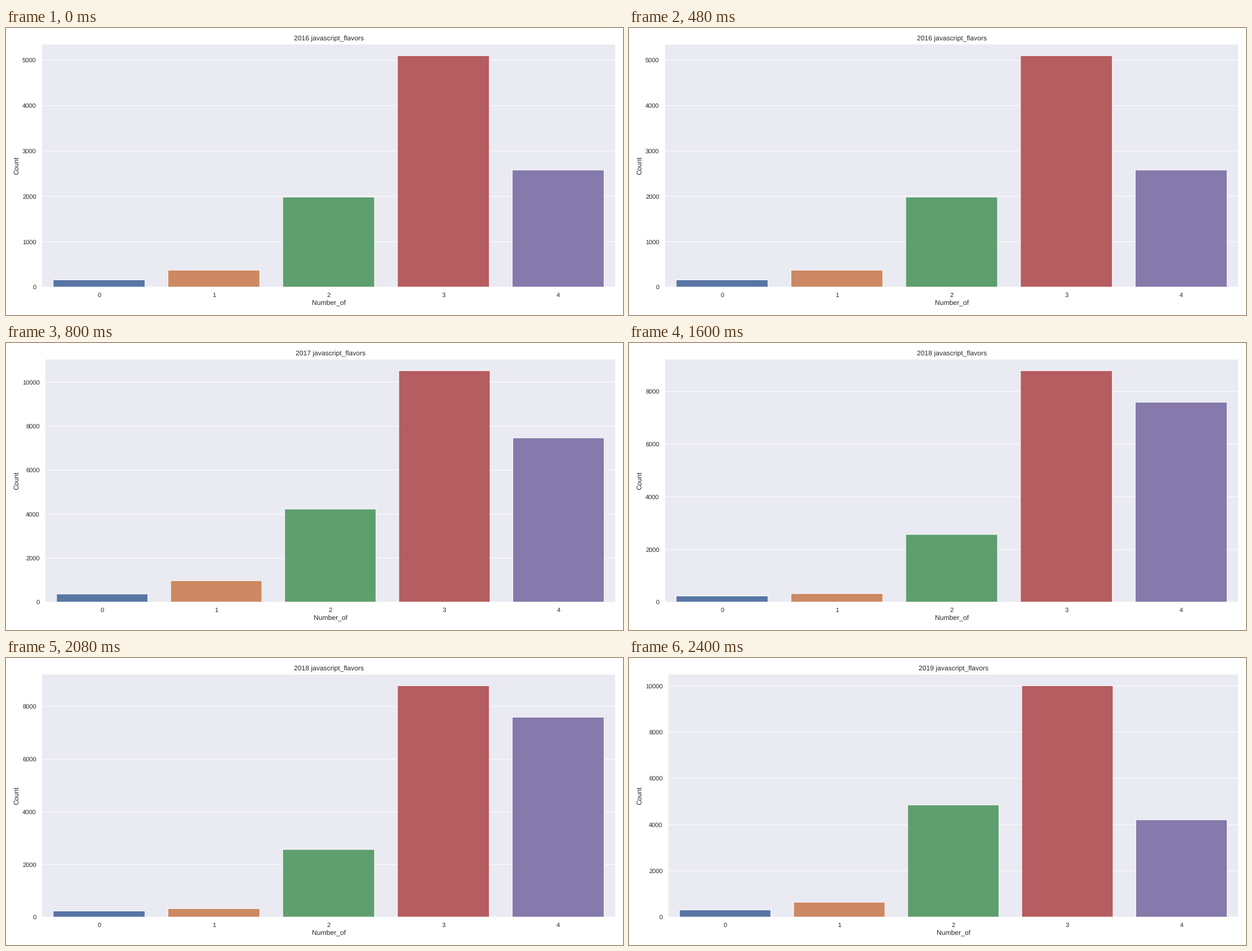
Animation, 1095 px wide and 511 px high, one loop 3.2 s. Source, as a matplotlib script:

```python
import matplotlib.pyplot as plt
from matplotlib.animation import FuncAnimation

W, H, DPI = 1095, 511, 73
RIGHT, TOP, BOTTOM = 1081.7, 28.7, 461.4
LABEL_SPACE, DIGIT = 39.0, 6.1  # the left margin grows with the tick labels
INK = "#262626"
COLORS = ["#5875a4", "#cc8963", "#5f9e6e", "#b55d60", "#857aab"]

COUNTS = {
    2016: [160, 375, 1985, 5100, 2580],
    2017: [370, 975, 4230, 10520, 7465],
    2018: [235, 325, 2570, 8790, 7595],
    2019: [310, 645, 4850, 10010, 4210],
}
YEARS = list(COUNTS)

plt.rcParams.update({
    "font.family": "Liberation Sans",
    "font.size": 12,
    "text.color": INK,
    "text.hinting": "none",
    "axes.facecolor": "#eaeaf2",
    "axes.edgecolor": "white",
    "axes.labelcolor": INK,
    "axes.labelsize": 12,
    "axes.titlesize": 12,
    "axes.linewidth": 1.25,
    "axes.axisbelow": True,
    "grid.color": "white",
    "grid.linewidth": 1,
    "xtick.color": INK,
    "ytick.color": INK,
    "xtick.labelsize": 11,
    "ytick.labelsize": 11,
    "xtick.major.size": 6,
    "ytick.major.size": 6,
    "xtick.bottom": False,
    "ytick.left": False,
})

fig, ax = plt.subplots(figsize=(W / DPI, H / DPI), dpi=DPI,
                       facecolor="white")


def draw(i):
    year = YEARS[i]
    counts = COUNTS[year]
    peak = max(counts)
    left = LABEL_SPACE + DIGIT * len(str(peak))

    ax.clear()
    ax.set_position([left / W, 1 - BOTTOM / H,
                     (RIGHT - left) / W, (BOTTOM - TOP) / H])
    ax.bar(range(len(counts)), counts, color=COLORS,
           edgecolor="white", linewidth=1, snap=False)
    ax.set_xlim(-0.5, len(counts) - 0.5)
    ax.set_ylim(0, peak * 1.05)
    ax.grid(axis="y", snap=False)
    ax.spines[:].set_snap(False)
    ax.set_title(f"{year} javascript_flavors")
    ax.set_xlabel("Number_of")
    ax.set_ylabel("Count")
    return ax.patches


anim = FuncAnimation(fig, draw, frames=len(YEARS), interval=800,
                     repeat=True, repeat_delay=0, blit=False)
plt.show()
```
